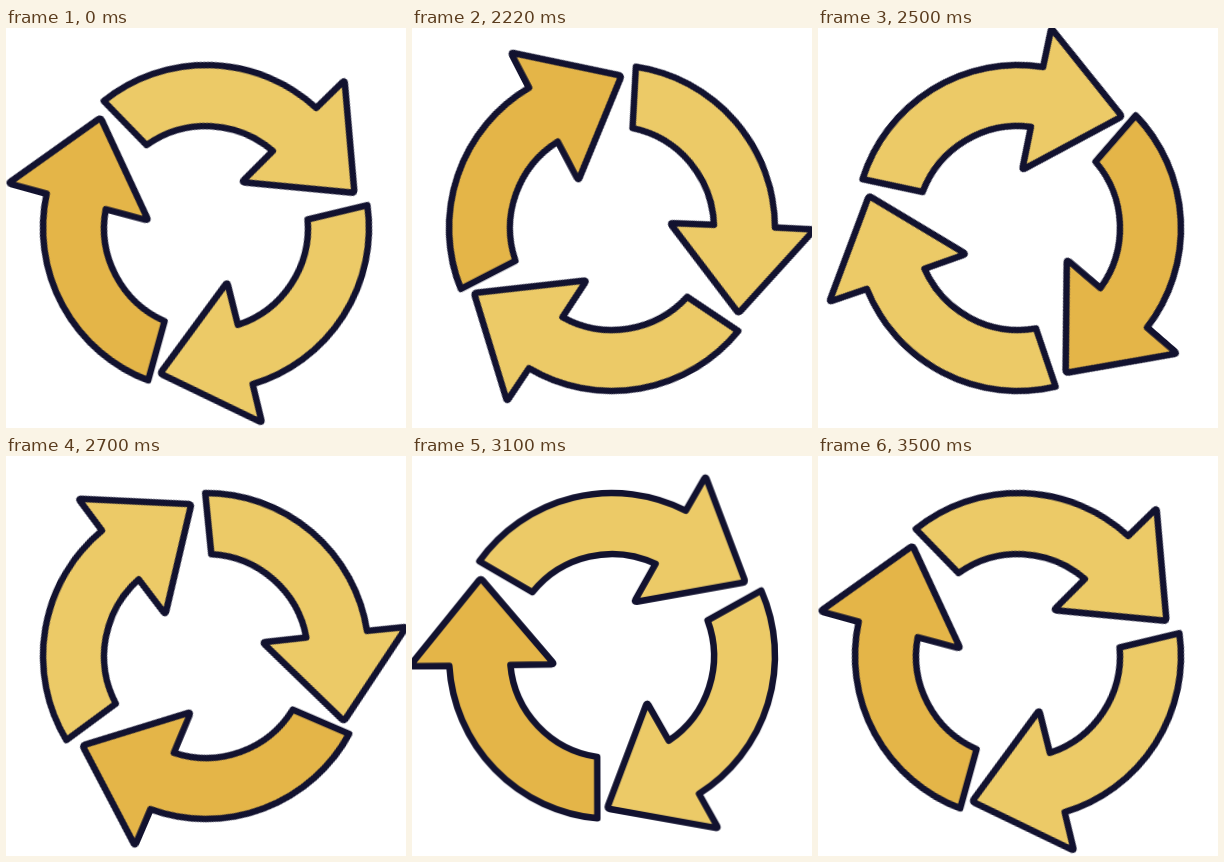
An HTML page without scripts that plays this animation: 400 px wide and 400 px high, repeating every 3.52 s.

```html
<!DOCTYPE html>
<html lang="en">
<head>
<meta charset="utf-8">
<title>Cycle arrows</title>
<style>
  html, body {
    margin: 0;
    width: 100%;
    height: 100%;
    overflow: hidden;
    background: #fff;
  }
  svg {
    display: block;
    width: 100%;
    height: 100%;
  }
  .ring {
    fill: #ecca67;
    stroke: #12122f;
    stroke-width: 6.5;
    stroke-linejoin: round;
    transform-origin: 200px 200px;
    animation: turn 3520ms infinite;
  }
  .accent { fill: #e4b548; }

  /* Rest for 2 s, one full turn in 1.5 s, then a 20 ms hold. */
  @keyframes turn {
    0% { transform: rotate(15.5deg); }
    56.818% {
      transform: rotate(15.5deg);
      animation-timing-function: cubic-bezier(.278, 0, .188, 1);
    }
    99.432%, 100% { transform: rotate(375.5deg); }
  }
</style>
</head>
<body>
<svg viewBox="0 0 400 400">
  <defs>
    <!-- Curved body, then a head with slightly rounded corners -->
    <path id="arrow" d="M185 362.3 A163 163 0 0 1 37.3 209.5
      L.6 209.7 Q-2.4 209.7 -.5 207.4
      L67.1 124.1 Q69 121.8 70.9 124.1
      L140.5 205.9 Q142.4 208.2 139.4 208.2
      L98.4 208.8 A102 102 0 0 0 185 300.9 Z"/>
  </defs>
  <g class="ring">
    <use href="#arrow" class="accent"/>
    <use href="#arrow" transform="rotate(120.4 200 200)"/>
    <use href="#arrow" transform="rotate(241.2 200 200)"/>
  </g>
</svg>
</body>
</html>
```
